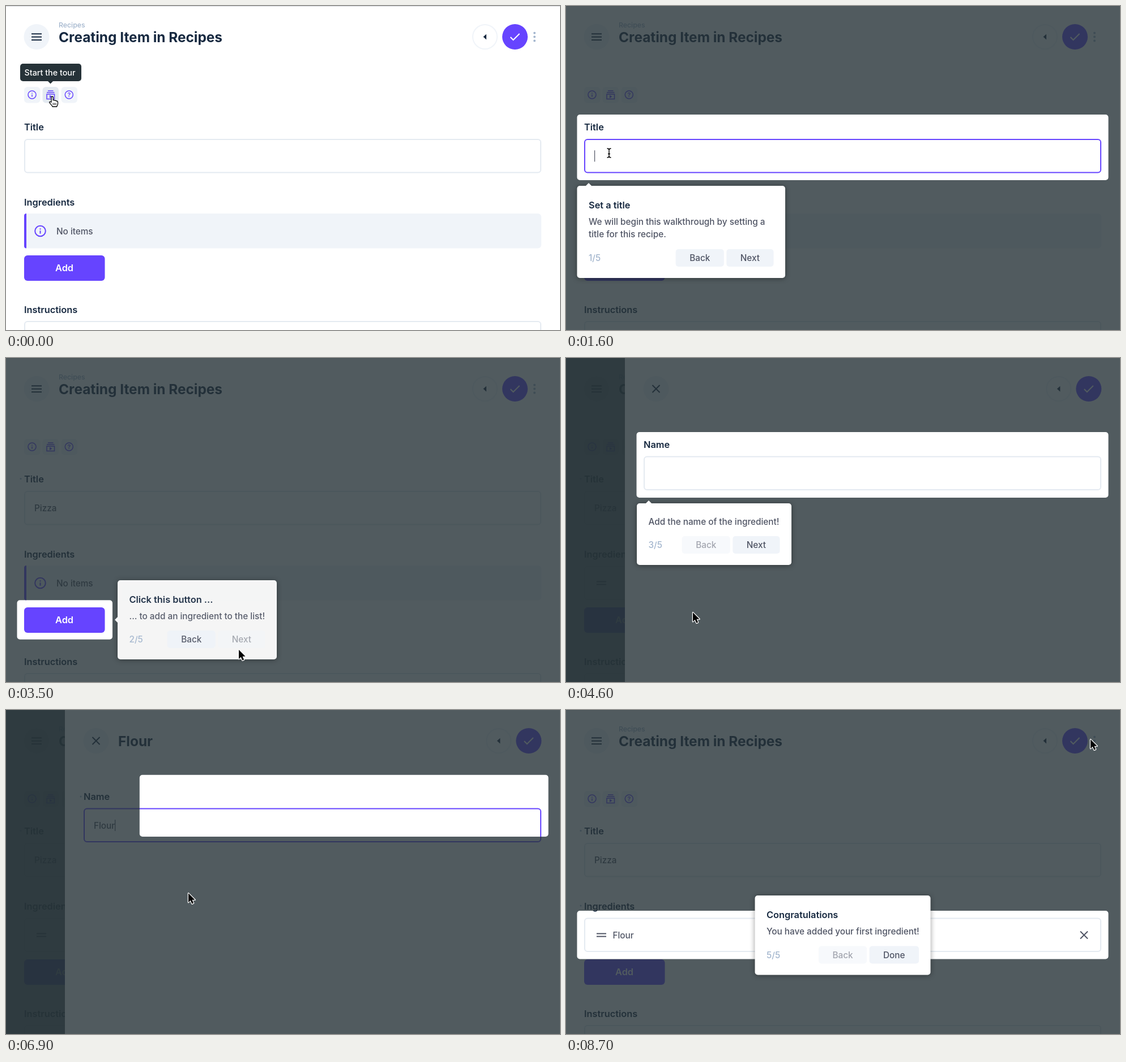
An HTML page with a canvas that plays this animation: 978 by 573 pixels, repeating every 9000 ms.

```html
<!DOCTYPE html>
<html lang="en">
<head>
<meta charset="utf-8">
<title>Guided tour</title>
<style>
html, body { margin: 0; width: 100%; height: 100%; overflow: hidden; background: #fff; }
canvas { display: block; }
</style>
</head>
<body>
<canvas id="stage" width="978" height="573"></canvas>
<script>
const ctx = document.getElementById('stage').getContext('2d');
const W = 978, H = 573, LOOP = 9000;
const PURPLE = '#6644ff', INK = '#172940', BODY = '#4f5464', FAINT = '#a2b5cd',
      PALE = '#f0f4f9', LINE = '#e4eaf1', DARK = '38,50,56';

const steps = [
  { at: 250, hole: [19.5, 192, 938, 116], box: [19.5, 318, 367.5, 163], arrow: [40, 313, 0, 1],
    title: 'Set a title',
    text: ['We will begin this walkthrough by setting a', 'title for this recipe.'] },
  { at: 3110, hole: [19.5, 428.5, 167.5, 69.5], box: [197, 393, 281, 140], arrow: [192, 463, 1, 0],
    title: 'Click this button ...', text: ['... to add an ingredient to the list!'], off: 'Next' },
  { at: 4190, hole: [124.5, 131, 833, 116], box: [125, 257, 273, 109], arrow: [146, 252, 0, 1],
    text: ['Add the name of the ingredient!'], off: 'Back' },
  { at: 6792, hole: [888, 20, 69.5, 69.5], box: [702, 100, 256, 109], arrow: [937, 95, 0, 1],
    text: ['Now save the new ingredient!'], off: 'Next', hideAt: 8200 },
  { at: 8290, hole: [19.5, 355, 938, 85.5], box: [333.5, 328, 310, 140.5],
    title: 'Congratulations', text: ['You have added your first ingredient!'], off: 'Back' }
];

// Pointer stops: time, x, y
const stops = [
  [0, 82, 160], [1000, 82, 160], [1600, 76, 260], [2400, 76, 260], [2800, 335, 447],
  [3050, 335, 447], [3500, 411, 516], [4000, 140, 464], [4100, 140, 464], [4600, 224, 450],
  [5000, 240, 206], [6000, 240, 206], [6700, 322, 324], [6950, 322, 324], [8000, 926, 52],
  [LOOP, 926, 52]
];

const HAND = new Path2D('M-2 10V1.6a1.6 1.6 0 0 1 3.2 0V6.8c1-.8 2.6-.5 3 .6 1-.6 2.4-.3 2.8.9 1.2-.5 2.5.2 2.5 1.7V13c0 2-1.5 3-1.8 5H0c-.5-2-3-4-5-6.6-1-1.6.6-2.7 1.8-1.7z');
const FINGERS = new Path2D('M1.2 11.5v3.5M3.6 11.5v3.5M6 11.5v3.5');
const ARROW = new Path2D('M0 0V16.2L3.7 12.7L6.4 18.8L9.1 17.6L6.5 11.7H11.6Z');
const IBEAM = new Path2D('M-3.5-8Q0-8 0-5.5Q0-8 3.5-8M0-6V6M-3.5 8Q0 8 0 5.5Q0 8 3.5 8M-2 1.5H2');

const clamp = v => Math.max(0, Math.min(1, v));
const easeInOut = p => p < .5 ? 2 * p * p : 1 - 2 * (1 - p) ** 2;
const mix = (a, b, p) => a + (b - a) * p;
const inside = (p, [x, y, w, h]) => p.x >= x && p.x <= x + w && p.y >= y && p.y <= y + h;

let hand = false, pointer;

function text(str, x, y, size = 15.3, weight = 500, color = BODY) {
  ctx.font = `${weight} ${size}px Inter, sans-serif`;
  ctx.fillStyle = color;
  ctx.fillText(str, x, y + size * .364);
}
const label = (str, x, y) => text(str, x, y, 16.35, 600, INK);
const heading = (str, x) => text(str, x, 55.3, 24.4, 700, INK);

function box(x, y, w, h, r, fill) {
  ctx.beginPath();
  ctx.roundRect(x, y, w, h, r);
  ctx.fillStyle = fill;
  ctx.fill();
}
function circle(x, y, r, fill, stroke, width = 1.5) {
  ctx.beginPath();
  ctx.arc(x, y, r, 0, 7);
  if (fill) { ctx.fillStyle = fill; ctx.fill(); }
  if (stroke) { ctx.strokeStyle = stroke; ctx.lineWidth = width; ctx.stroke(); }
}
function stroke(points, color, width = 2) {
  ctx.beginPath();
  for (let i = 0; i < points.length; i += 2) ctx.lineTo(points[i], points[i + 1]);
  ctx.strokeStyle = color;
  ctx.lineWidth = width;
  ctx.stroke();
}
function triangle(points, fill) {
  ctx.beginPath();
  for (let i = 0; i < 6; i += 2) ctx.lineTo(points[i], points[i + 1]);
  ctx.fillStyle = fill;
  ctx.fill();
}
function field(x, y, w, h, focus) {
  ctx.beginPath();
  ctx.roundRect(x + 1, y + 1, w - 2, h - 2, 5);
  ctx.fillStyle = '#fff';
  ctx.fill();
  ctx.strokeStyle = focus ? PURPLE : LINE;
  ctx.lineWidth = 2;
  ctx.stroke();
}
function typed(str, x, y, caret) {
  text(str, x, y);
  if (caret) {
    ctx.fillStyle = BODY;
    ctx.fillRect(Math.round(x + ctx.measureText(str).width), y - 10, 1.2, 20);
  }
}
function cross(x, y, r, color) {
  stroke([x - r, y - r, x + r, y + r], color);
  stroke([x - r, y + r, x + r, y - r], color);
}
function infoIcon(x, y, r, width) {
  circle(x, y, r, null, PURPLE, width);
  stroke([x, y - r * .08, x, y + r * .5], PURPLE, width);
  stroke([x, y - r * .5, x, y - r * .28], PURPLE, width);
}
function actions(x) {
  circle(x - 53, 54.5, 21.5, '#fff', PALE, 2);
  triangle([x - 50.5, 49.7, x - 50.5, 59.5, x - 56, 54.6], INK);
  circle(x, 54.5, 22.5, PURPLE);
  stroke([x - 8, 55, x - 3, 60, x + 8, 49], '#fff');
}
const dot = (x, y) => circle(x, y, 1.5, FAINT);

function drawPage(t) {
  ctx.fillStyle = '#fff';
  ctx.fillRect(0, 0, W, H);
  ctx.fillStyle = '#d9dbdf';
  ctx.fillRect(0, 0, W, 1);

  circle(54, 54.5, 22.5, PALE);
  for (const y of [49.3, 54.7, 60.1]) stroke([45, y, 63, y], INK);
  text('Recipes', 93, 34, 12.3, 500, FAINT);
  heading('Creating Item in Recipes', 93);
  actions(898.5);
  for (const y of [47.8, 54.6, 61.4]) circle(933, y, 2, FAINT);

  [32, 64.5, 97.5].forEach((x, i) => box(x, 143, 28.5, 28.5, 6, i === 1 && t < 300 ? LINE : PALE));
  infoIcon(46, 157, 7, 1.5);
  ctx.strokeStyle = PURPLE;
  ctx.lineWidth = 1.5;
  ctx.strokeRect(72, 156, 13.5, 8.5);
  stroke([72, 153, 85.5, 153], PURPLE, 1.5);
  stroke([74, 150, 83.5, 150], PURPLE, 1.5);
  triangle([77, 157.5, 77, 163, 81.5, 160.2], PURPLE);
  circle(111.3, 157, 7, null, PURPLE);
  text('?', 108.5, 157.2, 10.5, 600, PURPLE);

  label('Title', 32, 214.3);
  field(32, 235, 913, 60.5, t >= 1600 && t < 3100);
  typed('Pizza'.slice(0, clamp((t - 1900) / 500) * 5), 50, 265.3, t >= 1600 && t < 3100);
  if (t >= 3100) dot(26, 213.5);

  label('Ingredients', 32, 346.7);
  if (t >= 8200) dot(26, 346);
  if (t < 4200) {
    box(32, 367, 913, 61.5, 6, PALE);
    box(32, 367, 4, 61.5, [4, 0, 0, 4], PURPLE);
    infoIcon(60.5, 398, 9.3, 2);
    text('No items', 89, 398);
  } else {
    field(32, 367.5, 913, 60.5);
    stroke([54, 395.5, 71, 395.5], BODY);
    stroke([54, 400.5, 71, 400.5], BODY);
    if (t >= 8200) text('Flour', 82.5, 398);
    cross(914.5, 398, 6.5, BODY);
  }
  box(32, 441, 142.5, 45, 6, PURPLE);
  text('Add', 87, 463.3, 16.35, 600, '#fff');
  label('Instructions', 32, 536.7);
  field(32, 557, 913, 60);
}

function drawTooltip(alpha) {
  if (alpha <= 0) return;
  ctx.globalAlpha = alpha;
  box(25, 102, 108, 31, 5, '#263238');
  triangle([73.5, 132.5, 83.5, 132.5, 78.5, 137.5], '#263238');
  text('Start the tour', 32.5, 118, 14.3, 500, '#fff');
  ctx.globalAlpha = 1;
}

function drawDrawer(t) {
  const entering = 1 - (1 - clamp((t - 4050) / 300)) ** 2;
  const leaving = clamp((t - 8200) / 330) ** 2;
  const shown = entering - leaving;
  if (shown <= 0) return;
  const name = 'Flour'.slice(0, Math.max(0, (t - 5100) / 50));
  const focus = t >= 5200 && t < 7200;
  ctx.save();
  ctx.globalAlpha = shown;
  ctx.fillStyle = `rgba(${DARK},.78)`;
  ctx.fillRect(0, 0, W, H);
  ctx.translate(50 * (1 - shown), 0);
  ctx.fillStyle = '#fff';
  ctx.fillRect(104, 0, W - 104, H);
  circle(159, 54.5, 22.5, PALE);
  cross(159, 54.5, 6.5, INK);
  heading(name, 198);
  actions(922.8);
  label('Name', 137, 153);
  if (name) dot(132, 153);
  field(137, 173.5, 808, 60.5, focus);
  typed(name, 155, 204, focus && !(t >= 5600 && t < 6100));
  ctx.restore();
}

function button(str, right, y, disabled, alpha) {
  ctx.font = '500 15.3px Inter, sans-serif';
  const w = ctx.measureText(str).width + 49, rect = [right - w, y - 15.5, w, 31];
  ctx.globalAlpha = disabled ? alpha / 2 : alpha;
  box(...rect, 5, PALE);
  text(str, right - w + 24.5, y, 15.3, 500, BODY);
  ctx.globalAlpha = alpha;
  if (!disabled && inside(pointer, rect)) hand = true;
  return right - w - 4.5;
}

function drawPopover(step, index, t) {
  const alpha = clamp((t - step.at - (index ? 200 : 0)) / 200);
  if (!alpha || t >= step.hideAt) return;
  const [x, y, w, h] = step.box, left = x + 20.5, foot = y + h - 35.5;
  ctx.save();
  ctx.globalAlpha = alpha;
  ctx.shadowColor = 'rgba(0,0,0,.4)';
  ctx.shadowBlur = 10;
  ctx.shadowOffsetY = 1;
  box(x, y, w, h, 5, '#fff');
  ctx.shadowColor = 'transparent';
  if (step.arrow) {
    const [ax, ay, dx, dy] = step.arrow;
    triangle([ax, ay, ax + 5 * dx + 5 * dy, ay + 5 * dy + 5 * dx,
              ax + 5 * dx - 5 * dy, ay + 5 * dy - 5 * dx], '#fff');
  }
  if (step.title) label(step.title, left, y + 34);
  step.text.forEach((line, i) => text(line, left, y + (step.title ? 63.3 : 32) + i * 22.6));
  text(`${index + 1}/5`, left, foot, 15.3, 500, FAINT);
  const next = button(index === 4 ? 'Done' : 'Next', x + w - 20.5, foot, step.off === 'Next', alpha);
  button('Back', next, foot, step.off === 'Back', alpha);
  ctx.restore();
}

function pointerAt(t) {
  const i = stops.findIndex(s => s[0] > t), [t0, x0, y0] = stops[i - 1], [t1, x1, y1] = stops[i];
  const p = easeInOut((t - t0) / (t1 - t0));
  return { x: mix(x0, x1, p), y: mix(y0, y1, p) };
}

function drawPointer(beam) {
  ctx.save();
  ctx.translate(pointer.x, pointer.y);
  ctx.lineJoin = 'round';
  const outline = (path, color, width) => {
    ctx.strokeStyle = color;
    ctx.lineWidth = width;
    ctx.stroke(path);
  };
  if (beam) {
    outline(IBEAM, '#fff', 3);
    outline(IBEAM, '#000', 1.4);
  } else if (hand) {
    ctx.fillStyle = '#fff';
    ctx.fill(HAND);
    outline(HAND, '#000', 1.3);
    outline(FINGERS, '#000', 1);
  } else {
    outline(ARROW, '#fff', 2.4);
    ctx.fillStyle = '#000';
    ctx.fill(ARROW);
  }
  ctx.restore();
}

function draw(t) {
  pointer = pointerAt(t);
  hand = t < 300;
  let beam = false;
  drawPage(t);
  drawTooltip(1 - clamp((t - 250) / 200));
  drawDrawer(t);

  const index = steps.findLastIndex(s => s.at <= t);
  if (index >= 0) {
    const step = steps[index], from = steps[Math.max(0, index - 1)].hole;
    const p = easeInOut(clamp((t - step.at) / 400));
    const hole = step.hole.map((v, i) => mix(from[i], v, p));
    ctx.beginPath();
    ctx.rect(0, 0, W, H);
    ctx.roundRect(...hole, 5);
    ctx.fillStyle = `rgba(${DARK},${.8 * clamp((t - steps[0].at) / 200)})`;
    ctx.fill('evenodd');
    if (inside(pointer, hole)) {
      if (index % 2 || index === 4) hand = true;
      else beam = pointer.y > hole[1] + 43 && pointer.y < hole[1] + 104;
    }
    drawPopover(step, index, t);
  }
  drawPointer(beam);
}

// The picture advances ten times a second.
function tick() {
  draw(Math.floor(performance.now() / 100) * 100 % LOOP);
  requestAnimationFrame(tick);
}
tick();
</script>
</body>
</html>
```
